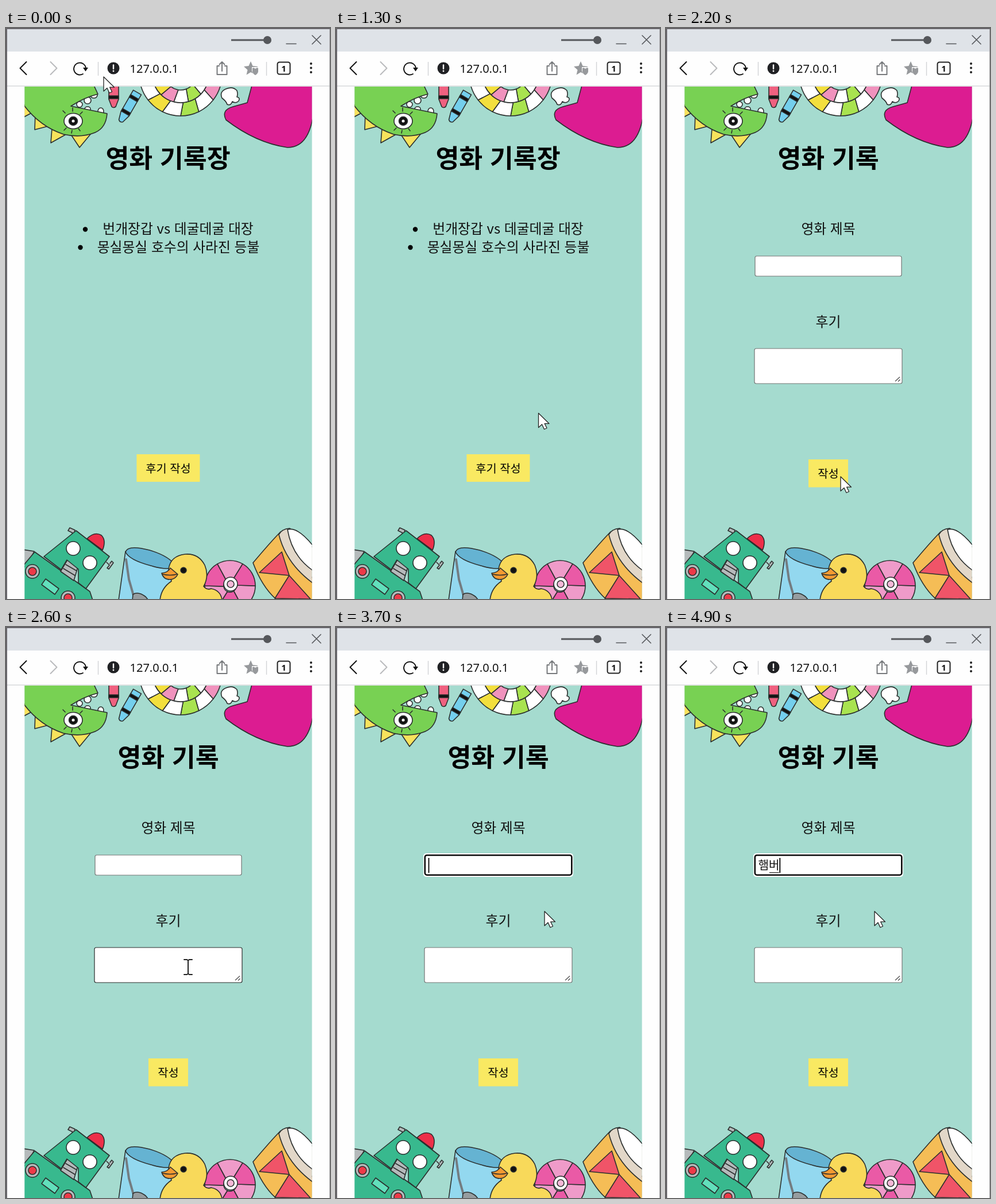
An HTML page for the animation above (5 s loop, 564 by 994 pixels).

```html
<!DOCTYPE html>
<html lang="ko">
<head>
<meta charset="utf-8">
<title>영화 기록장</title>
<style>
html, body { margin: 0; width: 100%; height: 100%; overflow: hidden; background: #fefefe; }
svg { display: block; width: 564px; height: 994px; }
text { font-family: "Noto Sans CJK KR", "Noto Sans CJK", sans-serif; fill: #111; }
.h { font-size: 44.5px; font-weight: 700; text-anchor: middle; fill: #000; }
.p { font-size: 23.8px; font-weight: 350; text-anchor: middle; }
.b { font-size: 19.8px; text-anchor: middle; fill: #000; }
.art { stroke: #2b2f2e; stroke-width: 1.6; stroke-linejoin: round; stroke-linecap: round; }
.line { fill: none; stroke-linecap: round; stroke-linejoin: round; }
</style>
</head>
<body>
<svg viewBox="0 0 564 994">
  <defs><clipPath id="page"><rect x="32.400" y="102" width="500.200" height="892"/></clipPath></defs>
  <rect width="564" height="994" fill="#fefefe"/>

  <g id="browser">
    <rect width="564" height="41" fill="#dfe3e8"/>
    <path d="M0 101H564" stroke="#d6d8da" stroke-width="1.5"/>
    <path d="M0 1H564M1 0V994" stroke="#68666b" stroke-width="2"/>
    <path d="M563.5 2V994" stroke="#9a999c"/>
    <path d="M392 21H455" stroke="#55575b" stroke-width="3"/>
    <circle cx="455" cy="21" r="7" fill="#55575b"/>
    <path class="line" d="M488 27.500H505M533 13L548 28M548 13L533 28" stroke="#55575b" stroke-width="1.600"/>
    <path class="line" d="M35.500 59L24.500 70L35.500 81" stroke="#111" stroke-width="2"/>
    <path class="line" d="M77.500 59L88.500 70L77.500 81" stroke="#b9babc" stroke-width="2"/>
    <path class="line" d="M134 80A10.500 10.500 0 1 1 139 70" stroke="#111" stroke-width="1.900"/>
    <path d="M134 69H143L138.500 75.500Z" fill="#111"/>
    <path d="M160.500 59V83M453.500 59V83" stroke="#cfd1d4" stroke-width="1.300"/>
    <circle cx="187" cy="70" r="10.500" fill="#202124"/>
    <path class="line" d="M187 64.500V71" stroke="#fff" stroke-width="2.400"/>
    <circle cx="187" cy="75" r="1.400" fill="#fff"/>
    <text x="215.500" y="78" style="font:20px 'Noto Sans','Open Sans',sans-serif">127.0.0.1</text>
    <path class="line" d="M371 66H367.500V81H384.500V66H381M376 75V59.500M371.500 63.500L376 59L380.500 63.500" stroke="#77797c" stroke-width="2"/>
    <path d="M426 58L429.500 66L438 67V68H428V75L430 79L426 77L418.500 81.500L420.500 73L414 67L422.500 66Z" fill="#97999c"/>
    <path d="M429 70Q431 68 434 71Q437 68 439 70V76Q438 80 434 82Q430 80 429 76Z" fill="#97999c"/>
    <rect x="472.500" y="59.500" width="22" height="21" rx="3.500" fill="none" stroke="#222" stroke-width="2"/>
    <text x="483.500" y="76" text-anchor="middle" style="font:600 15px 'Noto Sans','Open Sans',sans-serif">1</text>
    <g fill="#222"><circle cx="531" cy="62" r="2"/><circle cx="531" cy="69.500" r="2"/><circle cx="531" cy="77" r="2"/></g>
  </g>

  <g clip-path="url(#page)">
    <rect x="32" y="102" width="501" height="892" fill="#a5dbcf"/>
    <g class="art">
      <g id="dino">
        <path d="M30 132L48 146L31 155ZM51 149L50 177L73 171ZM80 175L78 200L103 186ZM114 187L128 208L147 185Z" fill="#f8e25c"/>
        <g fill="#fff"><ellipse cx="153" cy="117" rx="6" ry="5"/><ellipse cx="142" cy="126" rx="6" ry="6"/><ellipse cx="128" cy="133" rx="5" ry="5"/><ellipse cx="142" cy="141" rx="5" ry="4"/><ellipse cx="165" cy="145" rx="5" ry="6"/></g>
        <path d="M30 100H153L160 115Q136 121 113 136L176 149Q174 174 155 182Q130 192 100 185Q58 171 30 133Z" fill="#78d153"/>
        <path class="line" d="M103 148L99 144M116 145V139M129 150L133 146M105 174L101 178M115 178L114 183M126 175L129 179"/>
        <ellipse cx="117" cy="162" rx="16" ry="13.500" fill="#fff"/>
        <circle cx="117" cy="162" r="7.500" fill="#111"/><circle cx="117" cy="162" r="2.500" fill="#fff" stroke="none"/>
      </g>
      <g id="crayons">
        <path d="M179 100H196V124L191 137Q187 140 184 137L179 124Z" fill="#ef6180"/>
        <path d="M179 118H196V123H179Z" fill="#111"/>
        <g transform="translate(228 113) rotate(30)">
          <path d="M-8 -1H8V42L4 56Q0 60 -4 56L-8 42Z" fill="#74cfed"/>
          <path d="M-8 8H8V13H-8ZM-8 36H8V41H-8Z" fill="#111"/>
        </g>
      </g>
      <g id="candy"></g>
      <path d="M376 122Q371 111 383 106Q395 101 402 109Q404 115 402 120Q408 121 405 127Q400 132 394 128Q391 136 385 133Q383 127 376 122Z" fill="#fff"/>
      <path d="M428 100H535V150Q527 208 490 208Q435 200 383 160Q374 143 395 137L420 130Z" fill="#dc1c91"/>

      <g id="robot">
        <path d="M30 908L49 911L40 930L30 940Z" fill="#b5babb"/>
        <path d="M30 936L50 912L146 981L151 996H30Z" fill="#38b98e"/>
        <path d="M95 946L108 924L126 935L118 962Z" fill="#b5babb"/>
        <path d="M100 941L120 953M104 934L123 945" fill="none"/>
        <path d="M141 889Q154 876 166 883Q175 892 168 909Z" fill="#ed2f49"/>
        <path d="M112 885L116 879L108 875L111 870L120 874L118 882M175 930L180 935L176 940L179 942L187 931L184 928L181 932" fill="#b5babb"/>
        <path d="M122 875L180 920L139 976L126 966V942L106 926L96 943L66 920Z" fill="#38b98e"/>
        <circle cx="117" cy="906" r="12" fill="#fff"/><circle cx="146" cy="931" r="12" fill="#fff"/>
        <g fill="#b5babb"><circle cx="46" cy="946" r="12"/><circle cx="108" cy="992" r="12"/></g>
        <g fill="#ed3948"><circle cx="46" cy="946" r="7"/><circle cx="108" cy="992" r="7"/></g>
        <path d="M69 959L92 976L85 986L62 969Z" fill="#62dfbc"/>
      </g>
      <g id="bucket">
        <path d="M208 911L196 996H300V940Z" fill="#93d8ef"/>
        <path d="M209 925L214 960L222 988" fill="none" stroke="#737c81" stroke-width="4"/>
        <path d="M208 912Q212 899 250 909Q286 920 294 936Q286 946 252 936Q214 926 208 912Z" fill="#65b3d2"/>
        <path d="M221 986Q230 980 243 990L248 996H220Z" fill="#969da0"/>
      </g>
      <g id="ball"></g>
      <g id="duck">
        <path d="M288 963Q270 975 268 996H376Q374 979 357 976Q350 979 344 972Q354 954 346 935Q335 914 312 916Q286 919 283 942Z" fill="#f8d95a"/>
        <path d="M286 940Q282 948 271 949Q274 960 285 960Q295 960 299 951Z" fill="#f39a32"/>
        <path d="M273 951Q286 954 297 951" fill="none"/>
        <circle cx="309" cy="944" r="5" fill="#111"/>
      </g>
      <g id="drum">
        <path d="M478 877Q463 892 430 931Q446 974 472 996H535V960Z" fill="#f5bd56"/>
        <path d="M441 948L480 912L493 953ZM468 993L493 953L530 994Z" fill="#f05468"/>
        <path d="M475 882Q480 872 494 871L535 905V967Q488 933 475 882Z" fill="#e2d7c8"/>
        <path d="M490 873Q508 868 535 902V945Q498 920 490 873Z" fill="#fff"/>
      </g>
    </g>
  </g>

  <g id="list">
    <text class="h" x="282" y="243">영화 기록장</text>
    <circle cx="138" cy="350.500" r="4.200"/><circle cx="129.500" cy="382" r="4.200"/>
    <text class="p" x="299.500" y="358">번개장갑 vs 데굴데굴 대장</text>
    <text class="p" x="300" y="390">몽실몽실 호수의 사라진 등불</text>
    <rect x="227.400" y="742" width="110" height="48" fill="#f9e962"/>
    <text class="b" x="282.500" y="774">후기 작성</text>
  </g>

  <g id="form">
    <text class="h" x="282.500" y="243">영화 기록</text>
    <text class="p" x="282.500" y="358">영화 제목</text>
    <rect x="155" y="397" width="255" height="35" rx="3" fill="#fff" stroke="#767676" stroke-width="1.200"/>
    <g id="focus">
      <rect x="152" y="394" width="261" height="41" rx="5" fill="#fff"/>
      <rect x="154.800" y="397.200" width="255.500" height="34.500" rx="3.500" fill="#fff" stroke="#0b0b0b" stroke-width="2.600"/>
      <text id="typed" x="160.500" y="422" font-size="20" font-weight="350"></text>
      <path id="under" stroke="#222" stroke-width="1.200"/>
      <path id="caret" stroke="#000" stroke-width="1.800"/>
    </g>
    <text class="p" x="282.500" y="519.500">후기</text>
    <rect id="area" x="154" y="558" width="257" height="61" rx="3" fill="#fff" stroke-width="1.200"/>
    <path d="M399 615L407 607.500M404 615.500L407.500 612" stroke="#555" stroke-width="1.400"/>
    <rect x="248" y="751" width="69" height="48.500" fill="#f9e962"/>
    <text class="b" x="282.500" y="783">작성</text>
  </g>

  <path id="arrow" d="M0 0V25L6 19.500L10 28L14.500 26L10.700 18.200H18.500Z" fill="#fff" stroke="#222" stroke-width="1.300" stroke-linejoin="round"/>
  <path id="beam" class="line" d="M-7 -13H-2L0 -11.500L2 -13H7M0 -11.500V11.500M-7 13H-2L0 11.500L2 13H7" stroke="#222" stroke-width="2"/>
</svg>

<script>
const $ = id => document.getElementById(id);
const show = (id, on) => $(id).style.display = on ? '' : 'none';

function shape(parent, d, fill) {
  const el = document.createElementNS('http://www.w3.org/2000/svg', 'path');
  el.setAttribute('d', d);
  el.setAttribute('fill', fill);
  $(parent).append(el);
}

// Ring of wedges, angles in degrees
function ring(parent, cx, cy, inner, outer, from, step, colours) {
  const at = (r, a) => {
    const q = a * Math.PI / 180;
    return (cx + r * Math.cos(q)).toFixed(1) + ' ' + (cy + r * Math.sin(q)).toFixed(1);
  };
  colours.forEach((fill, i) => {
    const a = from + i * step, b = a + step;
    shape(parent, `M${at(outer, a)}A${outer} ${outer} 0 0 1 ${at(outer, b)}L${at(inner, b - 5)}A${inner} ${inner} 0 0 0 ${at(inner, a - 5)}Z`, fill);
  });
}

const disc = (parent, x, y, r, fill) =>
  shape(parent, `M${x - r} ${y}a${r} ${r} 0 1 0 ${2 * r} 0a${r} ${r} 0 1 0 ${-2 * r} 0Z`, fill);

const white = '#fff', yellow = '#f3df3d', lime = '#a9e34f', rose = '#f092bd';
ring('candy', 304, 81, 49, 72, 12, 26, [rose, white, lime, white, yellow, white]);
ring('candy', 304, 81, 27, 49, 14, 30, [white, lime, white, rose, yellow]);
ring('ball', 390, 971, 11, 44, 0, 60, Array.from({length: 6}, (_, i) => i % 2 ? '#ea5aa6' : '#ef9bc9'));
disc('ball', 391, 968, 12, white);
disc('ball', 391, 968, 6, '#f6b9d8');

const LOOP = 5000, OPEN = 2200, FOCUS = 3200;
// time, x, y
const path = [
  [0, 170, 85], [100, 170, 85], [800, 401, 554], [1000, 401, 560],
  [1600, 304, 781], [2200, 304, 781], [2600, 317, 592], [2800, 317, 570],
  [3100, 320, 416], [3300, 320, 416], [3600, 363, 495]
];
const typing = [[0, ''], [4400, 'ㅎ'], [4500, '해'], [4600, '햄'], [4800, '햄ㅂ'], [4900, '햄버']];

function pointer(t) {
  const i = path.findIndex(p => p[0] > t);
  if (i < 0) return path[path.length - 1].slice(1);
  const [t0, x0, y0] = path[i - 1], [t1, x1, y1] = path[i];
  const u = (t - t0) / (t1 - t0), k = u * u * (3 - 2 * u);
  return [x0 + (x1 - x0) * k, y0 + (y1 - y0) * k];
}

function draw(t) {
  const [x, y] = pointer(t), form = t >= OPEN;
  show('list', !form);
  show('form', form);
  show('focus', t >= FOCUS);

  const inside = (top, bottom) => form && x > 154 && x < 411 && y > top && y < bottom;
  const overArea = inside(558, 619), text = overArea || inside(397, 432);
  $('area').setAttribute('stroke', overArea ? '#2c2c2c' : '#767676');
  show('arrow', !text);
  show('beam', text);
  $(text ? 'beam' : 'arrow').setAttribute('transform', `translate(${x} ${y})`);

  const word = typing.filter(s => s[0] <= t).pop()[1];
  const end = 161 + word.length * 18.4;
  $('typed').textContent = word;
  $('under').setAttribute('d', word ? `M${end - 18} 427.5H${end - 1}` : '');
  $('caret').setAttribute('d', `M${end + .5} 402V428`);
  show('caret', word || (t - FOCUS) % 1000 < 600);
}

const start = performance.now();
function tick() {
  const t = (performance.now() - start) % LOOP;
  draw(Math.floor(t / 100) * 100);
  requestAnimationFrame(tick);
}
tick();
</script>
</body>
</html>
```
